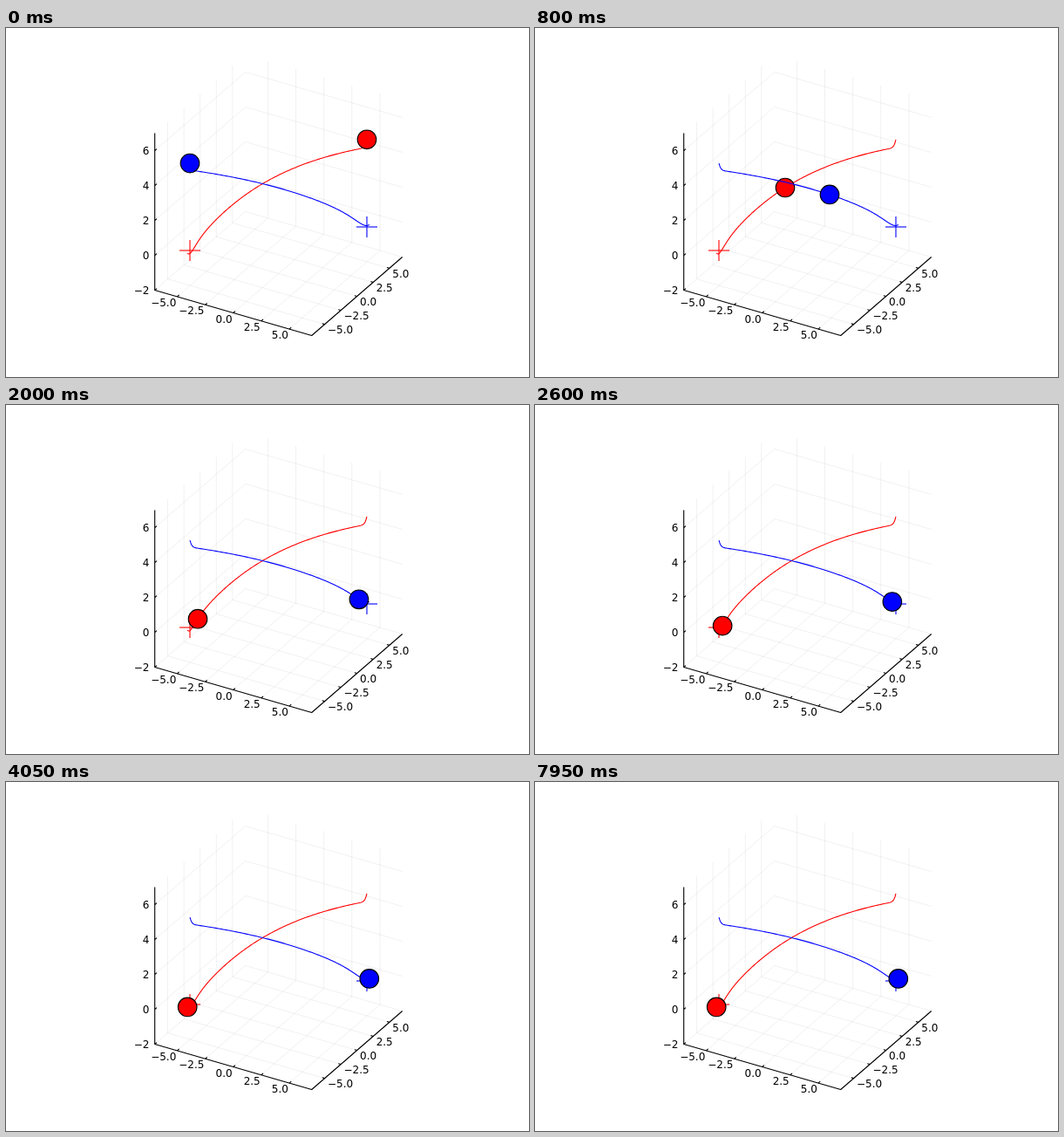
Recreate the animation shown at these times as an HTML page with a canvas. Size 600x400 px, loop 8000 ms.

```html
<!DOCTYPE html>
<html lang="en">
<head>
<meta charset="utf-8">
<title>Crossing trajectories</title>
<style>
html, body { margin: 0; width: 100%; height: 100%; overflow: hidden; background: #fff; }
canvas { display: block; }
</style>
</head>
<body>
<canvas id="stage" width="600" height="400"></canvas>
<script>
const ctx = document.getElementById('stage').getContext('2d');
const { exp, cosh, pow, min, max } = Math;
const LOOP = 8000, STEP = 50;
const LINE = 1.1;

// rise and bend shape the arc, dip flattens it near the goal, hook is the drop at the start
const AGENTS = [
  { color: '#f00', from: 414, to: 208.2, rest: 257.9, rise: 140, bend: 2,
    dip: 4.8, dipAt: 0.022, hook: 9, goal: [211, 255] },
  { color: '#00f', from: 211, to: 416.8, rest: 225.4, rise: 83, bend: 1.4,
    dip: 4.1, dipAt: 0.042, hook: 7.8, goal: [414, 228] }
];

function smoothstep(a, b, t) {
  const u = min(1, max(0, (t - a) / (b - a)));
  return u * u * (3 - 2 * u);
}

// Share of the way still to go after s seconds: a fast approach and a slow final creep
function remaining(s) {
  const creep = 0.16 / cosh(s / 1.16) * (1 - smoothstep(3.3, 3.7, s));
  return 0.84 * exp(-1.764 * pow(s, 1.75)) + creep;
}

function positionOf(a, ms) {
  const s = ms / 1000, d = remaining(s);
  const arc = a.rise * (1 - exp(-a.bend * d));
  const dip = a.dip * d / a.dipAt * exp(1 - d / a.dipAt);
  const hook = a.hook * exp(-pow(s / 0.055, 2));
  return [a.to + (a.from - a.to) * d, a.rest - arc + dip - hook];
}

function project(x, y, z) {
  return [
    170.7 + (x + 7) * 180 / 14 + (y + 7) * 104 / 14,
    300.5 + (x + 7) * 52 / 14 - (y + 7) * 90 / 14 - (z + 2) * 20
  ];
}

function stroke(points, color, width = LINE) {
  ctx.beginPath();
  points.forEach(p => ctx.lineTo(p[0], p[1]));
  ctx.strokeStyle = color;
  ctx.lineWidth = width;
  ctx.stroke();
}

function label(text, x, y, align) {
  ctx.textAlign = align;
  ctx.fillText(text.replace('-', '\u2212'), x, y);
}

function drawAxes() {
  const flat = [-5, -2.5, 0, 2.5, 5], tall = [-2, 0, 2, 4, 6];
  const line = (pts, color, width) => stroke(pts.map(p => project(...p)), color, width);
  const grid = (...pts) => line(pts, 'rgba(0, 0, 0, 0.1)', 0.6);
  for (const k of flat) {
    grid([k, -7, -2], [k, 7, -2], [k, 7, 7]);
    grid([7, k, -2], [-7, k, -2], [-7, k, 7]);
  }
  for (const z of tall) grid([-7, -7, z], [-7, 7, z], [7, 7, z]);

  line([[-7, -7, 7], [-7, -7, -2], [7, -7, -2], [7, 7, -2]], '#000');

  ctx.font = '12px "DejaVu Sans", sans-serif';
  ctx.textBaseline = 'alphabetic';
  ctx.fillStyle = '#000';
  const tick = ([x, y], dx, dy) => stroke([[x, y], [x + dx, y + dy]], '#000');
  for (const k of flat) {
    const a = project(k, -7, -2), b = project(7, k, -2);
    tick(a, 2.2, -1.9);
    tick(b, -2.8, -0.8);
    label(k.toFixed(1), a[0] - 1.1, a[1] + 11, 'right');
    label(k.toFixed(1), b[0] + 3.4, b[1] + 10.6, 'left');
  }
  for (const z of tall) {
    const p = project(-7, -7, z);
    tick(p, 2.2, -1.9);
    label(String(z), 164.5, p[1] + 4.9, 'right');
  }
}

function drawGoal([x, y], color) {
  stroke([[x - 12, y], [x + 12, y]], color);
  stroke([[x, y - 12], [x, y + 12]], color);
}

function drawBall([x, y], color) {
  ctx.beginPath();
  ctx.arc(x, y, 10.8, 0, Math.PI * 2);
  ctx.fillStyle = color;
  ctx.fill();
  ctx.strokeStyle = '#000';
  ctx.lineWidth = LINE;
  ctx.stroke();
}

function drawAgent(agent, t) {
  const trail = [];
  for (let ms = 0; ms <= LOOP; ms += 10) trail.push(positionOf(agent, ms));
  drawGoal(agent.goal, agent.color);
  stroke(trail, agent.color);
  drawBall(positionOf(agent, t), agent.color);
}

function frame() {
  const t = Math.floor(performance.now() % LOOP / STEP) * STEP;
  ctx.fillStyle = '#fff';
  ctx.fillRect(0, 0, 600, 400);
  ctx.lineJoin = 'round';
  drawAxes();
  AGENTS.forEach(agent => drawAgent(agent, t));
  requestAnimationFrame(frame);
}
frame();
</script>
</body>
</html>
```
